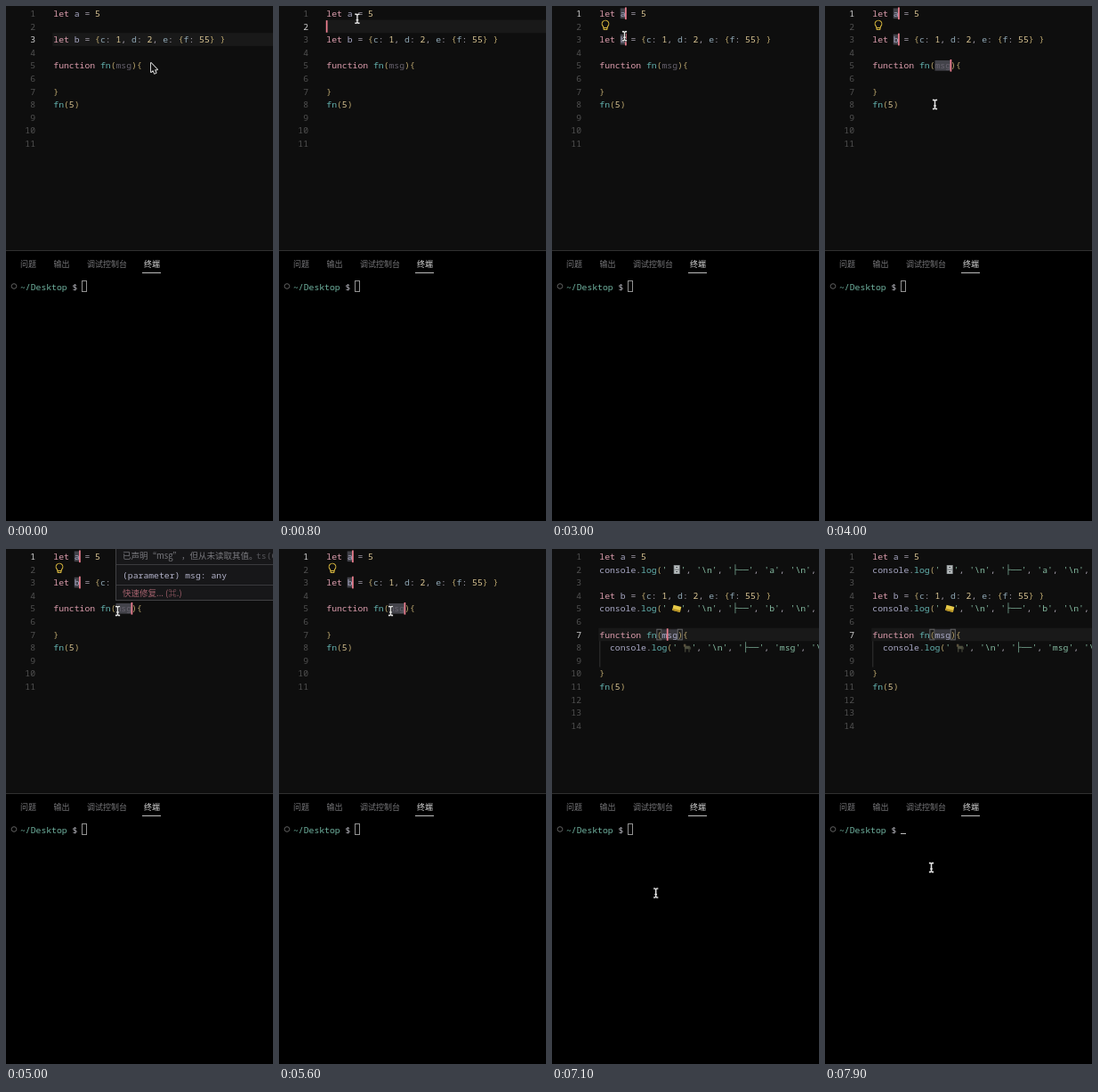
Animation of 300x578 px, one loop 8 s. Source, as an HTML page with a canvas:

```html
<!DOCTYPE html>
<html lang="zh">
<head>
<meta charset="utf-8">
<style>
html, body { margin: 0; width: 100%; height: 100%; overflow: hidden; background: #000; }
canvas { display: block; }
</style>
</head>
<body>
<canvas id="stage" width="300" height="578"></canvas>
<script>
const g = document.getElementById('stage').getContext('2d');
const MONO = '"Noto Sans Mono", "DejaVu Sans Mono", monospace';
const CJK = '"Noto Sans CJK SC", "Noto Sans CJK", "DejaVu Sans", sans-serif';
const CODE = `500 9.75px ${MONO}`;
const LEFT = 53.3, PITCH = 14.62, LOOP = 8000, EMOJI = 9.5;
const C = { key: '#dc9dad', fn: '#64b3b0', num: '#dbc694', brace: '#b9a46c', str: '#86bda3',
  name: '#a9a9c6', prop: '#8fa7b5', op: '#a9a3b0', dim: '#67626e', caret: '#ee7f90' };
let CW;

const rowTop = n => (n - 1) * PITCH + 1;
const mid = n => (n - 1) * PITCH + 8.4;
const col = n => LEFT + n * CW;

function rect(x, y, w, h, color) {
  g.fillStyle = color;
  g.fillRect(x, y, w, h);
}

function outline(x, y, w, h, color) {
  g.strokeStyle = color;
  g.lineWidth = 1;
  g.strokeRect(x, y, w, h);
}

function text(s, x, y, color, font = CODE, align = 'left') {
  g.font = font;
  g.fillStyle = color;
  g.textAlign = align;
  g.textBaseline = 'alphabetic';
  g.fillText(s, x, y + 3.5);
}

function tokenColor(s, next, unused) {
  if (s[0] === "'") return C.str;
  if (/^(let|function)$/.test(s)) return C.key;
  if (/^(fn|log)$/.test(s)) return C.fn;
  if (/^\d/.test(s)) return C.num;
  if (/^[{}()]/.test(s)) return C.brace;
  if (s === 'msg' && unused) return C.dim;
  if (/^\w/.test(s)) return next === ':' ? C.prop : C.name;
  return C.op;
}

function code(s, x, y, unused) {
  for (const m of s.matchAll(/'[^']*'|\w+|[^\s\w]/g))
    text(m[0], x + m.index * CW, y, tokenColor(m[0], s[m.index + m[0].length], unused));
}

const icons = [
  (x, y) => {
    rect(x + 1.5, y - 5, 7, 10, '#8c9294');
    for (const d of [-4, 1]) {
      rect(x + 2.5, y + d, 5, 3.3, '#bfc4c5');
      rect(x + 4, y + d + 1, 2, 1, '#41484a');
    }
  },
  (x, y) => {
    g.save();
    g.translate(x + 5, y);
    g.rotate(0.25);
    rect(-4.5, -3, 9, 6, '#e7ca48');
    rect(-4.5, 1, 9, 2, '#b69225');
    g.restore();
  },
  (x, y) => {
    rect(x + 2, y - 2, 6, 3.5, '#4c4e3d');
    rect(x + 1, y - 4, 2.5, 3, '#59503d');
    rect(x + 2.2, y + 1, 1.2, 4, '#45463a');
    rect(x + 6.5, y + 1, 1.2, 4, '#45463a');
    rect(x + 8, y - 1, 1.2, 3, '#34362d');
  }
];

function logLine(n, indent, icon, name) {
  const x = col(indent), y = mid(n);
  code('console.log(', x, y);
  text("'", x + 12 * CW, y, C.str);
  const end = x + 14 * CW + EMOJI;
  icons[icon](end - EMOJI, y);
  text("'", end, y, C.str);
  code(`, '\\n', '├──', '${name}', '\\n', ${name})`, end + CW, y);
}

function caret(x, n) {
  rect(x - 0.5, rowTop(n) + 0.5, 1.7, PITCH - 1, C.caret);
}

function select(n, from, len) {
  rect(col(from), rowTop(n) + 1.5, len * CW, PITCH - 3, '#43434a');
}

function bulb(x, y) {
  g.strokeStyle = '#d9b83f';
  g.lineWidth = 1.1;
  g.beginPath();
  g.arc(x, y - 2, 3.8, 2.3, 0.84);
  g.lineTo(x + 1.7, y + 4.5);
  g.lineTo(x - 1.7, y + 4.5);
  g.closePath();
  g.moveTo(x - 1.7, y + 2.5);
  g.lineTo(x + 1.7, y + 2.5);
  g.stroke();
}

function editor(t) {
  const logged = t >= 5700, clicked = t >= 6200;
  const rowB = logged ? 4 : 3, rowFn = logged ? 7 : 5;
  const picked = t >= 1800 && !clicked;
  const active = t < 500 ? 3 : t < 1800 ? 2 : clicked ? 7 : 1;

  rect(0, 0, 300, 274, '#0e0e0e');
  if (!picked) rect(LEFT - 1, rowTop(active), 300, PITCH, '#191919');

  for (let n = 1; n <= (logged ? 14 : 11); n++)
    text(n, 33, mid(n), n === active ? '#d0d0d0' : '#505050', CODE, 'right');

  if (picked) {
    select(1, 4, 1);
    if (t >= 2900) select(rowB, 4, 1);
    if (t >= 3600) select(rowFn, 12, 3);
  }
  if (clicked) {
    rect(col(12), rowTop(7) + 1.5, 3 * CW, PITCH - 3, '#37373c');
    for (const c of [11, 15]) outline(col(c) + 0.2, rowTop(7) + 1.5, CW - 0.8, PITCH - 3, '#68686a');
  }

  code('let a = 5', LEFT, mid(1));
  code('let b = {c: 1, d: 2, e: {f: 55} }', LEFT, mid(rowB));
  code('function fn(msg){', LEFT, mid(rowFn), !logged);
  code('}', LEFT, mid(logged ? 10 : 7));
  code('fn(5)', LEFT, mid(logged ? 11 : 8));

  if (logged) {
    rect(LEFT, rowTop(8), 1, 2 * PITCH, '#333');
    logLine(2, 0, 0, 'a');
    logLine(5, 0, 1, 'b');
    logLine(8, 2, 2, 'msg');
  }
  if (t >= 500 && t < 1800) caret(LEFT, 2);
  if (picked) {
    caret(col(5), 1);
    if (t >= 2900) caret(col(5), rowB);
    if (t >= 3600) caret(col(15), rowFn);
    if (t >= 2000 && !logged) bulb(60, 22);
  }
  if (clicked && t < 7500) caret(col(13), 7);
}

function tooltips(t) {
  if (t >= 1400 && t < 1900) {
    rect(78, 16, 89, 22, '#171719');
    outline(78.5, 16.5, 88, 21, '#414144');
    text('let a:', 84.5, 27, '#a7a7bb');
    text('number', 84.5 + 7 * CW, 27, '#c9a3ac');
  }
  if (t >= 4900 && t < 5600) {
    rect(123, -2, 180, 60, '#171719');
    outline(123.5, -2, 180, 59.5, '#414144');
    rect(124, 17, 176, 1, '#3a3a3d');
    rect(124, 40, 176, 1, '#3a3a3d');
    text('已声明“msg”，但从未读取其值。', 131, 7, '#77777c', `9.5px ${CJK}`);
    text('ts(6133)', 281, 7, '#55555a');
    text('(parameter) msg: any', 131, 29, '#b3b3ca');
    text('快速修复... (⌘.)', 131, 49.5, '#a5626e', `9.5px ${CJK}`);
  }
}

function panel(t) {
  rect(0, 274, 300, 304, '#000');
  rect(0, 274, 300, 1, '#303030');
  [['问题', 16], ['输出', 53.5], ['调试控制台', 91], ['终端', 155]].forEach(([s, x], i) =>
    text(s, x, 289.3, i === 3 ? '#d6d6d6' : '#77777a', `9px ${CJK}`));
  rect(153, 299, 21, 1, '#bcbcbc');

  g.strokeStyle = '#606060';
  g.lineWidth = 1;
  g.beginPath();
  g.arc(9, 314.5, 2.8, 0, 7);
  g.stroke();
  text('~/Desktop', 16, 315, '#70b3a0');
  text('$', 16 + 10 * CW, 315, '#b5b5bd');
  if (t < 7500) outline(85.5, 308.5, 5, 12, '#929292');
  else rect(85, 319, 6, 1, '#bdbdbd');
}

// time, x, y
const path = [
  [0, 165, 70], [100, 165, 70], [500, 100, 24], [1000, 81.5, 9], [2300, 81.5, 9],
  [2800, 81.5, 33], [3100, 81.5, 34], [3500, 134, 67], [3650, 134, 67], [4000, 123.5, 110.5],
  [4300, 123.5, 110.5], [4700, 125.5, 69.5], [5700, 125.5, 69.5], [6100, 129, 92],
  [6500, 129, 92], [7200, 116, 403], [7350, 116, 403], [7700, 119.5, 357.5], [8000, 119.5, 357.5]
];

function mouseAt(t) {
  const i = path.findIndex(p => p[0] > t);
  const [t0, x0, y0] = path[i - 1], [t1, x1, y1] = path[i];
  const u = (t - t0) / (t1 - t0), e = u * u * (3 - 2 * u);
  return [x0 + (x1 - x0) * e, y0 + (y1 - y0) * e];
}

function mouse(t) {
  const [x, y] = mouseAt(t);
  g.save();
  g.translate(x, y);
  g.lineJoin = 'round';
  g.beginPath();
  if (t < 200) {
    [[-2, -6], [-2, 4], [0.2, 2], [1.9, 5.7], [3.6, 4.9], [2, 1.5], [5, 1.3]]
      .forEach(p => g.lineTo(...p));
    g.closePath();
    g.lineWidth = 1.8;
    g.strokeStyle = '#e8e8e8';
    g.stroke();
    g.fillStyle = '#111';
    g.fill();
  } else {
    for (const s of [-1, 1]) {
      [[-2.6, 5], [-1, 5], [0, 4], [1, 5], [2.6, 5]].forEach(([px, py], i) =>
        i ? g.lineTo(px, py * s) : g.moveTo(px, py * s));
    }
    g.moveTo(0, -4);
    g.lineTo(0, 4);
    g.moveTo(-1.3, 1.5);
    g.lineTo(1.3, 1.5);
    for (const [w, c] of [[3, '#222'], [1.3, '#e8e8e8']]) {
      g.lineWidth = w;
      g.strokeStyle = c;
      g.stroke();
    }
  }
  g.restore();
}

function draw(now) {
  const t = now % LOOP;
  g.font = CODE;
  CW = g.measureText('m').width;
  editor(t);
  tooltips(t);
  panel(t);
  mouse(t);
}

const start = performance.now();
function tick() {
  draw(Math.max(0, performance.now() - start));
  requestAnimationFrame(tick);
}
tick();
</script>
</body>
</html>
```
